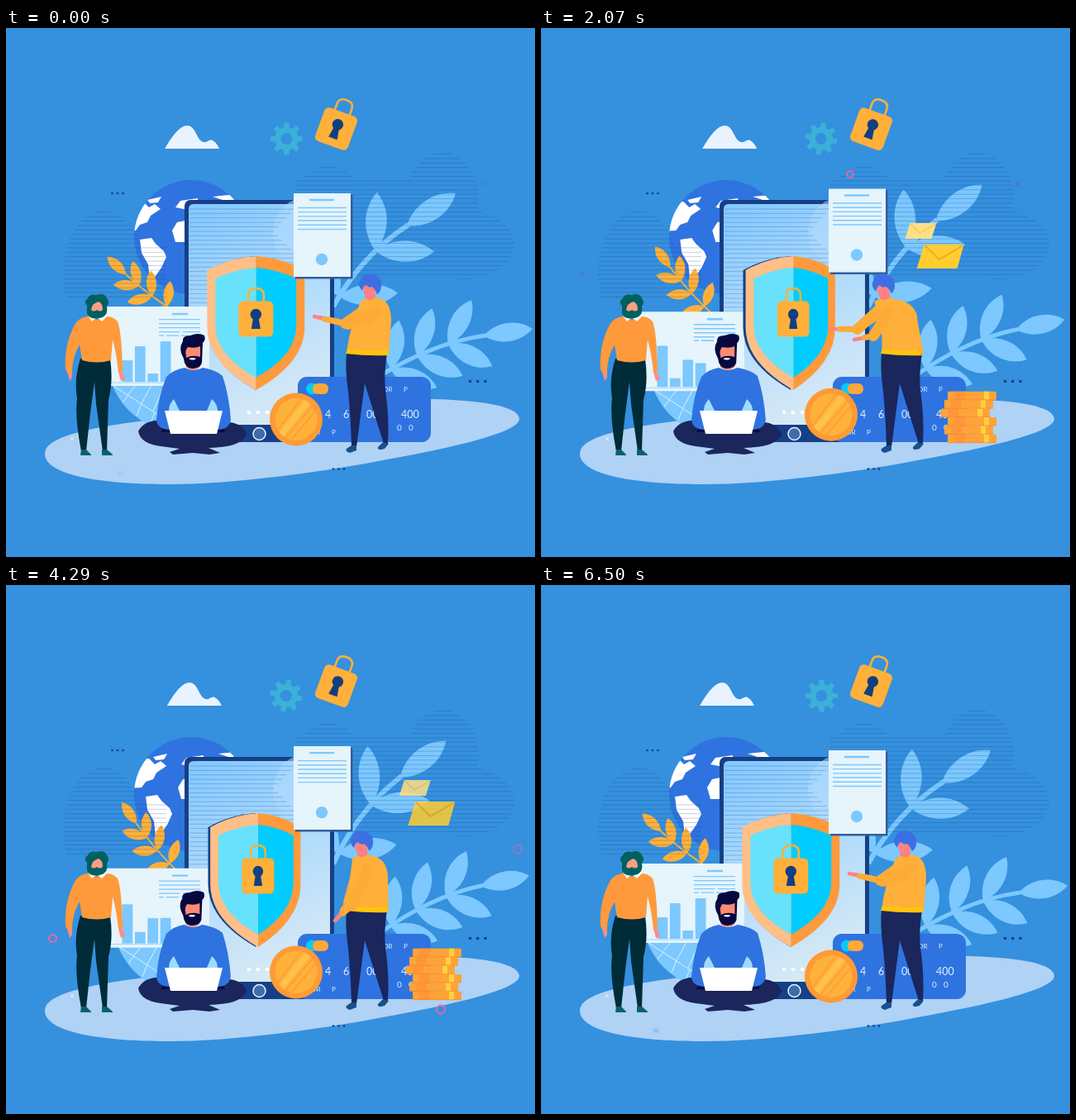
Animation of 640x640 px, one loop 6.57 s. Source, as an HTML page:

```html
<!DOCTYPE html>
<html lang="en">
<head>
<meta charset="utf-8">
<title>Data protection</title>
<style>
  html, body { margin: 0; width: 100%; height: 100%; overflow: hidden; background: #3590de; }
  svg { display: block; width: 100vw; height: 100vh; }
  text { font-family: Lato, sans-serif; fill: #e4f1ff; }
</style>
</head>
<body>
<svg viewBox="0 0 640 640">
  <defs>
    <linearGradient id="screen" x1=".2" y1="0" x2=".5" y2="1">
      <stop offset="0" stop-color="#86c9ff"/><stop offset=".5" stop-color="#b2dcfc"/><stop offset="1" stop-color="#d7e9f5"/>
    </linearGradient>
    <clipPath id="globeClip"><circle cx="224" cy="253" r="69"/></clipPath>
    <clipPath id="coinClip"><circle r="25.5"/></clipPath>
    <clipPath id="cloudClip">
      <ellipse cx="118" cy="296" rx="49" ry="75"/><rect x="118" y="262" width="76" height="70"/>
      <ellipse cx="528" cy="205" rx="44" ry="54"/><ellipse cx="390" cy="215" rx="42" ry="48"/>
      <ellipse cx="555" cy="262" rx="60" ry="42"/><rect x="350" y="180" width="205" height="121"/>
    </clipPath>
    <g id="lock">
      <path d="M-9.5-19V-29Q-9.5-37 0-37Q9.5-37 9.5-29V-19" fill="none" stroke="#ffb03a" stroke-width="2.6"/>
      <rect x="-21" y="-21.5" width="42" height="43" rx="5.5" fill="#ffb03a"/>
      <path d="M-3-3L-5.5 12H5.5L3-3Z" fill="#123f82"/><circle cy="-5.500" r="6.7" fill="#123f82"/>
    </g>
    <path id="rim" d="M0 276Q32 278 59 293V362Q59 405 0 438Z"/>
    <path id="plate" d="M0 290Q26 292 49 303V360Q49 396 0 423Z"/>
    <g id="smallCoin">
      <rect width="59" height="10.3" rx="1" fill="#ffa338"/>
      <path d="M8 0h13v10.300H8z" fill="#ff9638"/><path d="M44 0h6v10.300H44z" fill="#ffd13b"/>
      <path d="M0 10h59" stroke="#f58c30" stroke-width=".7"/>
    </g>
  </defs>

  <rect width="640" height="640" fill="#3590de"/>
  <path d="M47 515C47 490 130 478 230 468C350 455 480 446 540 450C600 453 621 463 621 473C621 490 535 509 440 526C345 543 250 553 190 552C100 551 47 538 47 515Z" fill="#afd2f5"/>

  <g id="dots" fill="#143f7c"></g>
  <path id="cloud" d="M192 146Q208 118 219 118C230 118 230 136 239 138C244 139 245 134 250 136Q255 139 258 146Z" fill="#e8f3ff"/>
  <g id="gear"></g>

  <circle cx="224" cy="253" r="69" fill="#2f73e0"/>
  <g clip-path="url(#globeClip)"><g id="land" fill="#fff">
    <path d="M135 246L157 245L162 238L171 235L175 227L187 219L180 213L173 217L166 210L135 212Z"/>
    <path d="M171 208L188 204L184 211L174 212Z"/>
    <path d="M162 256L176 254L181 261L191 270L194 277L188 290L181 300L174 305L172 286L164 272Z"/>
    <path d="M201 245L207 235L222 232L240 240V262L216 259L205 259Z"/>
    <path d="M205 217L211 209L232 206V217L215 219Z"/><path d="M250 204L290 200V215L262 208Z"/>
  </g></g>
  <g id="orangePlant" fill="#ffb03a" stroke="#ffb03a"></g>
  <g id="plantA" fill="#7cc8ff" stroke="#7cc8ff"></g>
  <g id="plantB" fill="#7cc8ff" stroke="#7cc8ff"></g>
  <g id="rules" clip-path="url(#cloudClip)" stroke="#143f7c" stroke-width=".5" opacity=".5"></g>

  <rect x="216" y="208" width="181" height="293" rx="7" fill="#173f85"/>
  <path d="M221 480V219Q221 213 227 213H392V480Z" fill="url(#screen)"/>
  <circle cx="366" cy="247" r="43" fill="#b4dcff" opacity=".55"/>
  <g id="screenRules" stroke="#2563ae" stroke-width=".55" opacity=".6"></g>
  <circle cx="306.5" cy="491" r="7.5" fill="#3f6cab" stroke="#e8f3ff" stroke-width="1.5"/>
  <path d="M294 465h.01M305 465h.01M316 465h.01" stroke="#fff" stroke-width="4.6" stroke-linecap="round"/>

  <g id="leafFan"><path d="M128 431Q143 468 178 482H205V431Z" fill="#7cc8ff"/>
    <path d="M130 433Q160 452 205 482M148 443L157 432M164 454L176 432M178 463L190 436M148 444L141 453M164 454L158 469M180 465L174 480" fill="none" stroke="#e8f5ff" stroke-width=".9"/></g>
  <g id="report">
    <path d="M119 337H246V433H119Z" fill="#e6f4fb"/>
    <path d="M124 429H190" stroke="#9dd5fd"/>
    <g id="bars" fill="#7cc8ff"></g>
    <path d="M202 346H219" stroke="#7cc8ff" stroke-width="2.4" stroke-linecap="round"/>
    <path d="M185 352.500H235M185 357.500H235M185 362.500H235M185 367.500H210M214 367.500H235M185 372H191M194 372H209M212 372H220" stroke="#7cc8ff" stroke-width="1.3"/>
  </g>

  <use href="#rim" fill="#14418a" transform="translate(302.3 0) scale(-.98 1)"/>
  <g id="shield">
    <g id="shieldRight"><use href="#rim" fill="#ff9a3c"/><use href="#plate" fill="#00ccff"/></g>
    <g id="shieldLeft"><use href="#rim" fill="#ffbf86"/><use href="#plate" fill="#68e1fd"/></g>
    <g id="shieldLock"><use href="#lock" y="352"/></g>
  </g>

  <g id="doc">
    <path d="M350 202H419.500V303.500H350Z" fill="#315f9a"/><path d="M348 200H417V301H348Z" fill="#e6f4fb"/>
    <path d="M368 208H396" stroke="#7cc8ff" stroke-width="2.4" stroke-linecap="round"/>
    <g id="docLines" stroke="#7cc8ff" stroke-width="1.4"></g>
    <circle cx="382" cy="280" r="7.2" fill="#7cc8ff"/>
    <path id="check" d="M378 280L381 283.500L387 275" fill="none" stroke="#fff" stroke-width="2.3"/>
  </g>
  <g id="bigLock"><use href="#lock" transform="translate(399.5 122) rotate(20)"/></g>

  <rect x="353" y="422" width="161" height="79" rx="11" fill="#2f73e0"/>
  <circle cx="370" cy="436.5" r="7" fill="#00ccff"/><rect x="371" y="430" width="19" height="13" rx="6" fill="#ffa83a"/>
  <g font-size="8"><text x="456" y="439.5">OR</text><text x="481" y="439.5">P</text><text x="369" y="491.5">OR</text><text x="394" y="491.5">P</text></g>
  <g font-size="12.5"><text x="386" y="472">4</text><text x="408" y="472">6</text><text x="436" y="472">00</text><text x="478" y="472">400</text></g>
  <g font-size="10"><text x="473" y="486.5">0</text><text x="487" y="486.5">0</text></g>
  <g id="bigCoin"><circle r="32" fill="#ff9a35"/><circle r="25.5" fill="#ffb23a"/>
    <g clip-path="url(#coinClip)"><path d="M-21 22L19-28" stroke="#ffc24d" stroke-width="7"/>
      <path d="M-26 18L10-30M-16 26L28-26M-9 29L33-22" stroke="#ff9a35" stroke-width="1.6"/></g></g>
  <g id="stack"></g>

  <!-- standing man, left -->
  <path d="M90 400H126Q130 428 124 450L122 512H117L109 455L107 428Q101 470 97 512H91Q83 470 86 448Q82 425 90 400Z" fill="#002b38"/>
  <path d="M91 510H97L103 516V517H90ZM116 510H122L129 516V517H116Z" fill="#0b6068"/>
  <path d="M74 416L80 415L80 423L77 427ZM136 416L140 414L144 425L139 427Z" fill="#ff8c86"/>
  <path d="M99 349Q88 350 83 359Q70 384 72 413L75 418L80 416Q80 399 89 383L92 402Q110 407 127 402L129 377Q134 395 136 417L141 414Q140 368 135 355Q129 348 120 349L110 353Z" fill="#ff9a3c"/>
  <path d="M99 348L103 345H118L122 349L116 355L110 350L104 355Z" fill="#f3f9ff"/>
  <path d="M98 336Q93 331 99 327Q101 321 110 323Q119 320 122 327Q126 331 122 337Q124 349 113 351Q100 353 98 345Z" fill="#00605f"/>
  <path d="M103 341Q104 333 112 331Q117 333 117 341Q114 344 110 341Q106 344 103 341Z" fill="#ff9c86"/>

  <!-- seated man -->
  <path d="M196 475Q168 472 160 488Q163 503 187 506L210 509L198 513L202 516L226 514L246 516L259 514L245 508Q287 507 291 491Q286 475 255 476Z" fill="#1a265c"/>
  <path d="M192 477H259L265 489H188Z" fill="#0b0c42"/>
  <path id="sweater" fill="#2f73e0"/>
  <path id="cuffs" fill="#9cdcff"/>
  <path d="M192 463H262L255 491H199Z" fill="#fff"/>
  <g id="seatedHead">
    <path d="M219 402H236V410Q228 417 219 411Z" fill="#ff8a73"/>
    <path d="M216 400Q209 388 215 379Q214 372 224 372Q234 368 241 372Q243 378 239 381L238 405Q236 412 226 412Q217 411 216 400Z" fill="#07083f"/>
    <path d="M219 397Q217 390 221 386Q230 388 236 385V398Q227 395 219 399Z" fill="#ff8a73"/>
    <path d="M222 400Q227 398 231 400Q227 403 222 400Z" fill="#fff"/>
  </g>

  <!-- pointing man -->
  <path d="M412 393H461Q457 420 459 438Q464 474 462 503H457L434 430L424 507H418Q417 470 414 440Q410 412 412 393Z" fill="#1a265c"/>
  <path d="M418 505H424V511L416 514Q410 512 412 509ZM456 501L463 503L458 509Q449 512 450 507Z" fill="#17508d"/>
  <g id="farArm"></g>
  <path id="torso" fill="#ffb03a"/><path id="hem" fill="#ffc40c"/>
  <g id="nearArm"></g>
  <g id="pointingHead">
    <path d="M-6 8H7V13Q1 19-5 14Z" fill="#ff7d7f"/>
    <path d="M-8 2Q-8 12 0 13Q7 12 8 1L5-5H-8Z" fill="#ff8285"/>
    <path d="M-9 5Q-16-2-11-9Q-8-16 1-16Q13-13 14-4Q15 5 9 9L7 4L3 0Q-1 2-4-2Q-8-1-9 5Z" fill="#3c6fe2"/>
  </g>

  <g id="mail">
    <g id="mailSmall"><path d="M6 0H38L32 19H0Z" fill="#ffdf85"/><path d="M7 1L18 12L37 1" fill="none" stroke="#f4c34f" stroke-width="1.3"/></g>
    <g id="mailLarge"><path d="M9 0H57L49 29H0Z" fill="#ffcd2f"/><path d="M10 1L27 18L56 1" fill="none" stroke="#f4a91b" stroke-width="2"/></g>
  </g>
  <path d="M78 495L82 499M82 495L78 499" stroke="#fff" opacity=".7"/>
  <g id="marks" fill="none"></g>
</svg>
<script>
const LOOP = 6570, TAU = Math.PI * 2;
const el = id => document.getElementById(id);
const repeat = (n, make) => [...Array(n).keys()].map(make).join('');
const clamp = v => Math.max(0, Math.min(1, v));
const smooth = v => { const k = clamp(v); return k * k * (3 - 2 * k); };
const plateau = (t, rise, full, fall, end) => smooth((t - rise) / (full - rise)) * smooth((end - t) / (end - fall));
const set = (id, attrs) => { for (const k in attrs) el(id).setAttribute(k, attrs[k]); };
const move = (id, x, y, rest = '') => set(id, { transform: `translate(${x} ${y}) ${rest}` });

const leaf = (x, y, degrees, length, width) => {
  const a = length * .3, b = length * .72, w = width * .68;
  return `<path stroke="none" transform="translate(${x} ${y}) rotate(${degrees})"
    d="M0 0C${a} ${w} ${b} ${w} ${length} 0C${b} ${-w} ${a} ${-w} 0 0Z"/>`;
};
// A curved stem with an end leaf and mirrored pairs; the spread narrows from base to tip.
function plant(id, [x0, y0], [x1, y1], [x2, y2], pairs, [wide, narrow], length, width, thickness) {
  const bend = (a, b, c, k) => (1 - k) ** 2 * a + 2 * k * (1 - k) * b + k * k * c;
  const slope = (a, b, c, k) => (1 - k) * (b - a) + k * (c - b);
  const leafAt = (k, turn) => {
    const heading = Math.atan2(slope(y0, y1, y2, k), slope(x0, x1, x2, k)) * 360 / TAU;
    return leaf(bend(x0, x1, x2, k), bend(y0, y1, y2, k), heading + turn, length, width);
  };
  el(id).innerHTML = `<path d="M${x0} ${y0}Q${x1} ${y1} ${x2} ${y2}" fill="none" stroke-width="${thickness}"/>` +
    leafAt(.98, 0) + pairs.map(k => {
      const spread = wide + (narrow - wide) * k;
      return leafAt(k, spread) + leafAt(k, -spread);
    }).join('');
}
plant('plantA', [396, 337], [430, 275], [487, 238], [.1, .62], [57, 37], 71, 25, 6);
plant('plantB', [455, 419], [520, 380], [580, 372], [.08, .33, .63], [52, 40], 60, 22, 5);
plant('orangePlant', [210, 347], [170, 322], [144, 297], [.2, .45, .7], [75, 20], 31, 12, 1.8);

const rule = (x1, x2, y) => `<path d="M${x1} ${y}H${x2}"/>`;
el('rules').innerHTML = repeat(33, i => rule(60, 620, 152.5 + i * 5.4));
el('screenRules').innerHTML = repeat(24, i => rule(222, 324 + 26 * clamp(Math.abs(i - 5) / 5), 219 + i * 5.4));
el('docLines').innerHTML = repeat(6, i => rule(353, 412, 217.5 + i * 5.2));
const trio = (x, y, gap, r) => repeat(3, i => `<circle cx="${x + i * gap}" cy="${y}" r="${r}"/>`);
el('dots').innerHTML = trio(128.5, 200, 6.5, 1.3) + trio(561.5, 427.5, 9.2, 1.8) + trio(396, 533.5, 6.5, 1.3);
el('gear').innerHTML = '<circle r="10.5" fill="none" stroke="#3bb1d8" stroke-width="7"/>' +
  repeat(8, i => `<path d="M-3.6-12L-2.8-19.5H2.8L3.6-12Z" fill="#3bb1d8" transform="rotate(${i * 45})"/>`);

const coinShifts = [8, 4, 8, 0, 4, 8];
el('stack').innerHTML = repeat(coinShifts.length, i =>
  `<use href="#smallCoin" x="${484 + coinShifts[i]}" y="${491.7 - i * 10.4}"/>`);
const barHeights = [[26, 53], [43, 6], [10, 36], [49, 26]];
el('bars').innerHTML = repeat(barHeights.length, i => `<rect x="${140.5 + i * 15.4}" width="12.8"/>`);

const cross = (x, y, color) => `<path d="M${x - 3} ${y - 3}l6 6m0-6l-6 6" stroke="${color}"/>`;
const ring = (x, y, r) => `<circle cx="${x}" cy="${y}" r="${r}" stroke="#f8649f" stroke-width="1.8"/>`;
const marks = [
  { shape: ring(56.5, 427.5, 4.4), beats: 4, peak: .5 },
  { shape: ring(526, 513.5, 5), beats: 4, peak: .54 },
  { shape: ring(619, 319.5, 5.3), beats: 4, peak: .47 },
  { shape: ring(374, 177, 3.8), beats: 4, peak: .2 },
  { shape: cross(50, 297, '#5f5fce'), beats: 4, peak: .16 },
  { shape: cross(577, 188.5, '#6a5ac8'), beats: 4, peak: .14 },
  { shape: cross(139, 539, '#2f73e0') + '<path d="M135 539h8" stroke="#2f73e0"/>', beats: 1, peak: .84 }
];
el('marks').innerHTML = marks.map(mark => `<g>${mark.shape}</g>`).join('');

const gestures = {
  point: { head: 440, nearX: 372, nearY: 349, farX: 378, farY: 350 },
  push: { head: 414, nearX: 378, nearY: 377, farX: 348, farY: 364 },
  rest: { head: 430, nearX: 397, nearY: 406, farX: 399, farY: 404 }
};
function arm(id, sx, sy, hx, hy) {
  const ex = sx + (hx - sx) * .45, ey = sy + (hy - sy) * .5 + 13;
  const cuff = 1 - 14 / Math.hypot(hx - ex, hy - ey);
  const wx = ex + (hx - ex) * cuff, wy = ey + (hy - ey) * cuff;
  el(id).innerHTML = `<g fill="none" stroke="#fdab36" stroke-linecap="round" stroke-linejoin="round">
    <path d="M${wx} ${wy}L${hx + 1} ${hy}" stroke="#ff8285" stroke-width="4.5"/>
    <path d="M${sx} ${sy}L${ex} ${ey}" stroke-width="13"/>
    <path d="M${sx - 6} ${sy + 12}L${ex} ${ey}L${wx} ${wy}" stroke-width="7"/></g>`;
}

function drawPointingMan(t) {
  const push = plateau(t, 400, 1450, 2650, 3800), rest = plateau(t, 2800, 4250, 4350, 5500);
  const blend = key => gestures.point[key] + push * (gestures.push[key] - gestures.point[key]) +
    rest * (gestures.rest[key] - gestures.point[key]);
  const head = blend('head'), back = 466 + (head - 440) * .4;
  set('torso', { d: `M${head - 11} 331Q${head + 2} 323 ${head + 14} 328Q${back} 332 ${back} 355L463 394H412Q415 364 ${head - 11} 331Z` });
  set('hem', { d: `M413 388Q438 392 ${back - 3} 389L462 396Q438 397 411 394Z` });
  arm('farArm', head - 3, 339, blend('farX'), blend('farY'));
  arm('nearArm', head + 8, 342, blend('nearX'), blend('nearY'));
  move('pointingHead', head, 313, `rotate(${(head - 435) * .25})`);
}

function drawSeatedMan(angle, bob) {
  const sway = 1.3 + 3.6 * Math.cos(angle * 3 - 2.27), tuck = 4 * bob;
  move('seatedHead', sway, 0);
  set('sweater', { d: `M${194 + tuck * .3} 422Q${204 + sway} 413 ${217 + sway} 411Q${228 + sway} 417 ${239 + sway} 411Q255 414 ${262 - tuck * .3} 421
    Q${270 - tuck} 445 ${272 - tuck} 474Q270 486 255 486H199Q183 486 ${182 + tuck} 474Q${184 + tuck} 446 ${194 + tuck * .3} 422Z` });
  set('cuffs', { d: `M${203 + tuck * .5} 449Q197 455 197 463H210ZM${249 - tuck * .5} 449Q256 455 256 463H243Z` });
}

function draw(t) {
  const angle = t / LOOP * TAU;
  const wave = (1 - Math.cos(angle)) / 2;
  const early = (1 - Math.cos(angle + .19)) / 2;
  const held = smooth(early);
  const bob = (1 - Math.cos(angle * 3)) / 2;

  move('cloud', 4 * early, 0);
  move('gear', 339.5 - early, 134, `rotate(${14 * wave})`);
  move('land', 9 * wave, 0);
  move('orangePlant', 2 * wave, 4 * wave, `rotate(${15.3 * wave} 210 345)`);
  set('plantA', { transform: `rotate(${-6 * wave} 398 335)` });
  set('plantB', { transform: `rotate(${-5 * wave} 455 418)` });

  move('leafFan', 10 * early, 7 * early);
  move('report', 0, 8 * early);
  barHeights.forEach(([from, to], i) => {
    const height = from + (to - from) * held, bar = el('bars').children[i];
    bar.setAttribute('y', 428 - height);
    bar.setAttribute('height', height);
  });

  // The far side of the shield narrows more than the near side as it turns.
  move('shield', 302.3 + 3.7 * early, 0);
  set('shieldRight', { transform: `scale(${1 - .18 * early} 1)` });
  set('shieldLeft', { transform: `scale(${-1 + .03 * early} 1)` });
  set('shieldLock', { transform: `scale(${1 - .1 * early} 1)` });

  move('doc', 0, -7 * early);
  set('check', { opacity: clamp((bob - .65) / .2) });
  move('bigLock', 0, 7 * bob);
  move('bigCoin', 351, 473.5 - 6.5 * held);
  const fromEnds = Math.min(t, LOOP - t);
  [...el('stack').children].forEach((coin, i) => { coin.style.display = fromEnds >= 700 + i * 190 ? '' : 'none'; });

  drawSeatedMan(angle, bob);
  drawPointingMan(t);

  const glide = clamp((t - 850) / 3800) ** .8;
  move('mailLarge', 430 + 61 * glide, 262);
  move('mailSmall', 413 + 68 * glide, 236);
  set('mail', { opacity: clamp((t - 850) / 400) * clamp((4650 - t) / 420) });

  marks.forEach(({ beats, peak }, i) => {
    const glow = clamp(4 * Math.cos(beats * angle - TAU * peak) - 2);
    el('marks').children[i].setAttribute('opacity', glow);
  });
}

function frame() {
  draw(performance.now() % LOOP);
  requestAnimationFrame(frame);
}
frame();
</script>
</body>
</html>
```
